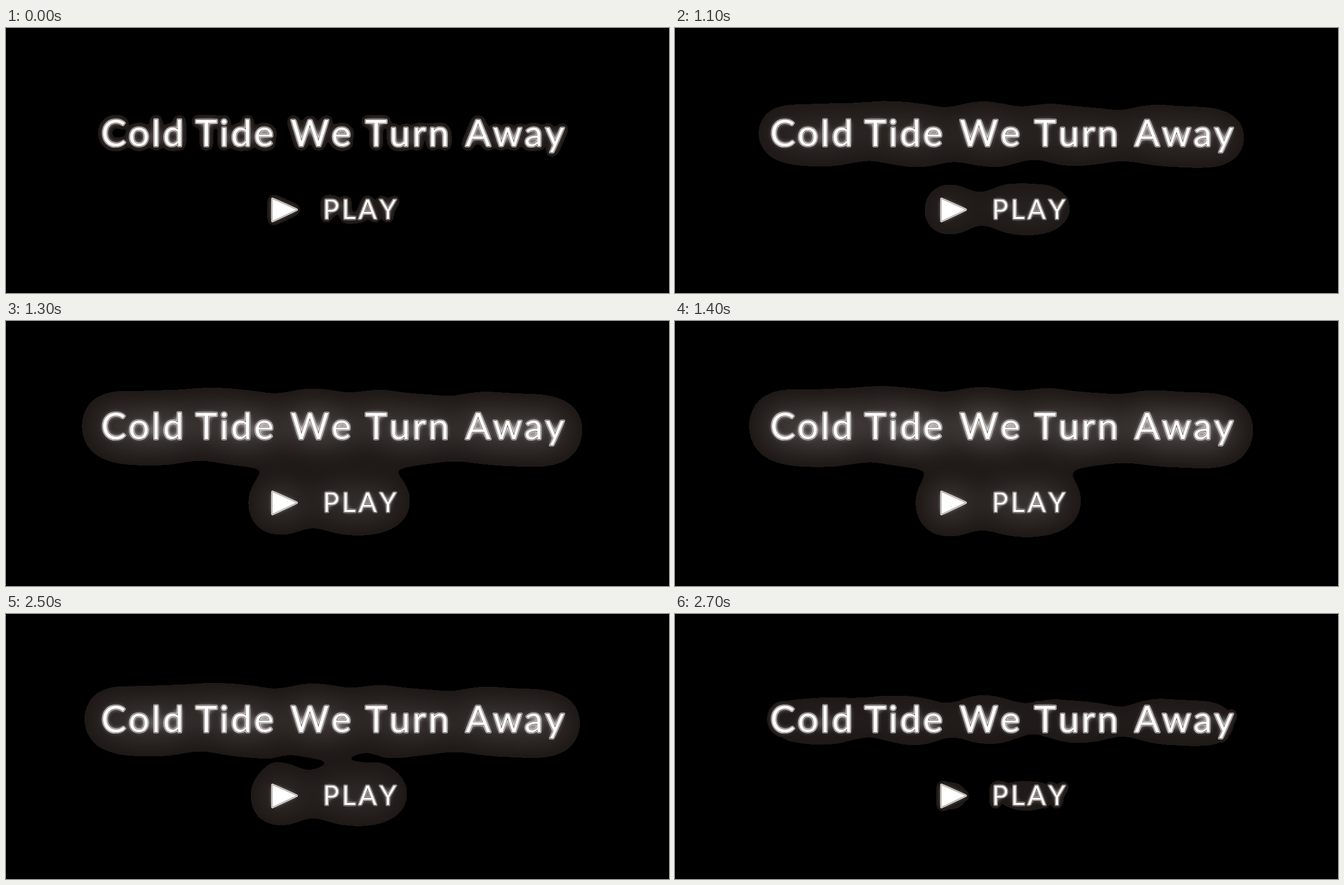
Write an HTML page with a canvas that moves like this. It is 1183 px wide and 473 px high and loops after 2.8 s.

```html
<!DOCTYPE html>
<html lang="en">
<head>
<meta charset="utf-8">
<title>Play</title>
<style>
  html, body { margin: 0; width: 100%; height: 100%; overflow: hidden; background: #000; }
  canvas { display: block; width: 100%; height: 100%; }
</style>
</head>
<body>
<canvas id="stage" width="1183" height="473"></canvas>
<script>
const W = 1183, H = 473, LOOP = 2800;

// Start time of each step and its glow level.
const STEPS = [
  [0, 0], [1000, 1], [1100, 2], [1200, 3], [1300, 4],
  [1400, 5], [2400, 4], [2500, 3], [2600, 2], [2700, 1]
];

// Lowest blurred coverage that still glows, per level.
const CUTOFF = [Infinity, 0.096, 0.053, 0.036, 0.029, 0.0245];
const HALO_CUTOFF = 0.07;
const EDGE = 30;

const TITLE = [["Cold", 170], ["Tide", 338], ["We", 508], ["Turn", 641], ["Away", 820]];

function makeCanvas() {
  const canvas = document.createElement("canvas");
  canvas.width = W;
  canvas.height = H;
  const ctx = canvas.getContext("2d", { willReadFrequently: true });
  ctx.lineJoin = "round";
  return ctx;
}

function setFont(ctx, size, spacing) {
  ctx.font = `400 ${size}px Lato, sans-serif`;
  ctx.letterSpacing = spacing + "px";
  ctx.fontKerning = "none";
}

function word(ctx, text, x, y) {
  if (ctx.lineWidth > 0.1) ctx.strokeText(text, x, y);
  ctx.fillText(text, x, y);
}

function drawTitle(ctx) {
  setFont(ctx, 66, 4.3);
  for (const [text, x] of TITLE) word(ctx, text, x, 211);
}

function drawLabel(ctx) {
  setFont(ctx, 48, 5);
  word(ctx, "PLAY", 565.5, 341);
}

function drawArrow(ctx) {
  ctx.beginPath();
  ctx.moveTo(475.5, 305);
  ctx.lineTo(518.5, 324.3);
  ctx.lineTo(475.5, 344.5);
  ctx.closePath();
  ctx.stroke();
  ctx.fill();
}

// Each part: rim width, contour width, contour colour, weight in the glow.
const PARTS = [
  { draw: drawTitle, rim: 3.6, line: 1.8, dark: "#57504d", weight: 0.82 },
  { draw: drawLabel, rim: 3, line: 1.9, dark: "#4a4340", weight: 1 },
  { draw: drawArrow, rim: 4.4, line: 1.6, dark: "#6e6764", weight: 0.75 }
];

function paint(ctx, draw, color, width) {
  ctx.fillStyle = ctx.strokeStyle = color;
  ctx.lineWidth = width;
  draw(ctx);
}

// Outer rim, thin dark contour and bright core.
function drawMetal(ctx) {
  for (const { draw, rim, line, dark } of PARTS) {
    paint(ctx, draw, "#f3efed", rim);
    paint(ctx, draw, dark, line);
    paint(ctx, draw, "#fff", 0.1);
  }
}

function coverage() {
  const ctx = makeCanvas();
  for (const { draw, rim, weight } of PARTS) {
    ctx.globalAlpha = 1;
    paint(ctx, draw, `rgba(255, 255, 255, 1)`, rim);
    // Thin the part down to its weight without doubling stroke and fill.
    ctx.globalCompositeOperation = "destination-out";
    ctx.globalAlpha = 1 - weight;
    const top = draw === drawTitle ? 0 : 260;
    const left = draw === drawLabel ? 540 : 0;
    ctx.fillStyle = "#000";
    if (weight < 1) ctx.fillRect(left, top, W, 260);
    ctx.globalCompositeOperation = "source-over";
  }
  const data = ctx.getImageData(0, 0, W, H).data;
  return Float32Array.from({ length: W * H }, (_, i) => data[i * 4 + 3] / 255);
}

// Running mean along rows or columns.
function boxPass(src, lines, lineStep, length, step, r) {
  const out = new Float32Array(src.length);
  for (let n = 0; n < lines; n++) {
    const base = n * lineStep;
    let sum = 0;
    for (let i = 0; i < r; i++) sum += src[base + i * step];
    for (let i = 0; i < length; i++) {
      if (i + r < length) sum += src[base + (i + r) * step];
      if (i - r - 1 >= 0) sum -= src[base + (i - r - 1) * step];
      out[base + i * step] = sum / (2 * r + 1);
    }
  }
  return out;
}

function blur(src, r) {
  let out = src;
  for (let pass = 0; pass < 3; pass++) {
    out = boxPass(out, H, W, W, 1, r);
    out = boxPass(out, W, 1, H, W, r);
  }
  return out;
}

const mask = coverage();
const halo = blur(mask, 5);
const aura = blur(mask, 30);

function makeFrame(cutoff) {
  const ctx = makeCanvas();
  const image = ctx.createImageData(W, H);
  const px = image.data;
  for (let i = 0; i < W * H; i++) {
    const near = Math.max(0, halo[i] - HALO_CUTOFF);
    const far = Math.max(0, aura[i] / cutoff - 1);
    const light = near || far ? EDGE + 420 * near * near + 5.5 * far : 0;
    px[i * 4] = light;
    px[i * 4 + 1] = light - 5;
    px[i * 4 + 2] = light - 7;
    px[i * 4 + 3] = 255;
  }
  ctx.putImageData(image, 0, 0);
  drawMetal(ctx);
  return ctx.canvas;
}

const frames = CUTOFF.map(makeFrame);
const stage = document.getElementById("stage").getContext("2d");

function render(now) {
  const t = now % LOOP;
  const level = STEPS.findLast(([start]) => start <= t)[1];
  stage.drawImage(frames[level], 0, 0);
  requestAnimationFrame(render);
}
render(performance.now());
</script>
</body>
</html>
```
